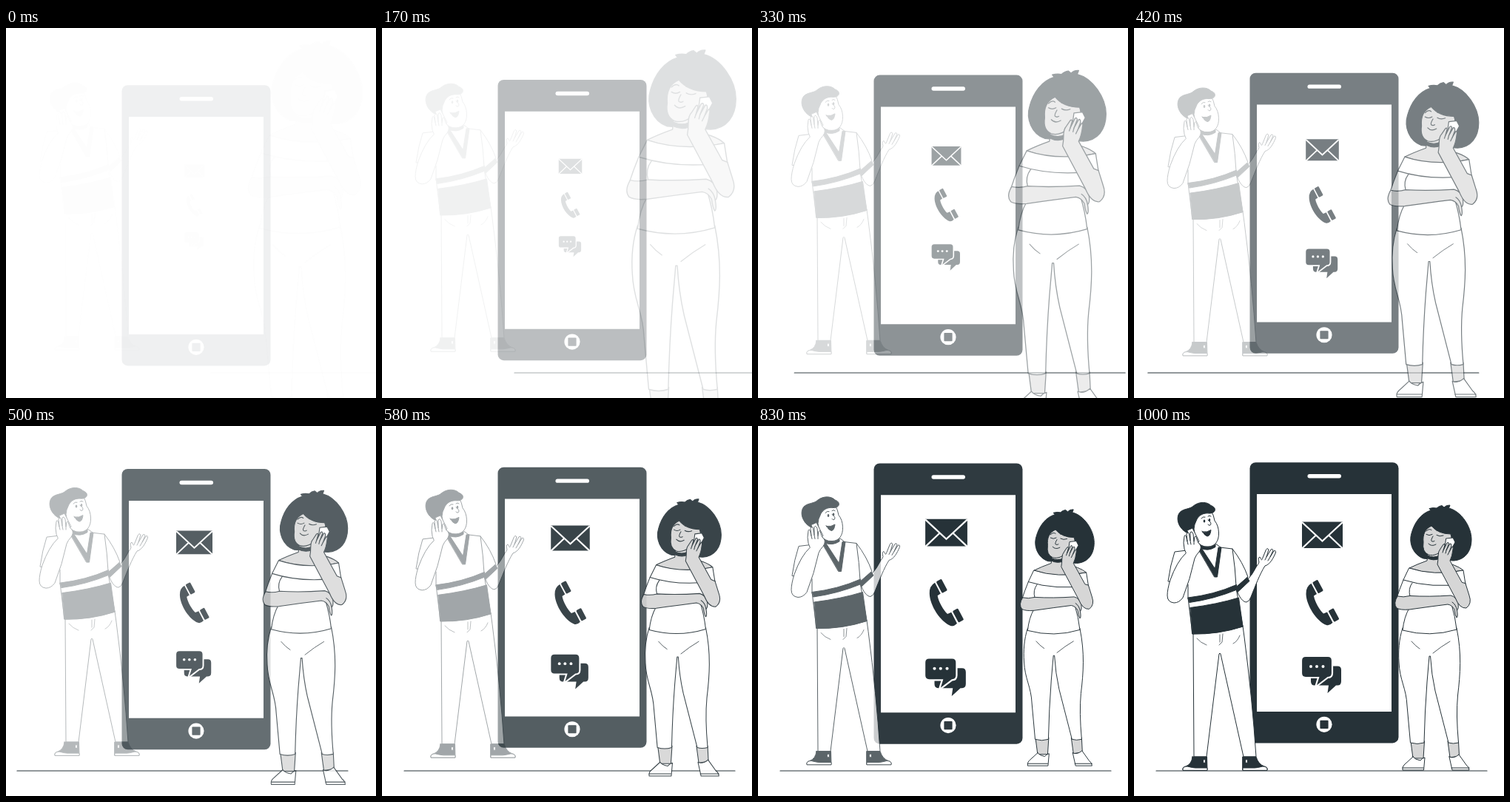
Write an HTML page that moves like this. It is 500 px wide and 500 px high and loops after 1040 ms.

```html
<!DOCTYPE html>
<html lang="en">
<head>
<meta charset="utf-8">
<title>Phone call</title>
<style>
html, body { margin: 0; width: 100%; height: 100%; overflow: hidden; background: #fff; }
svg { display: block; width: 100vw; height: 100vh; }
.line { fill: none; stroke: #263238; stroke-linecap: round; stroke-linejoin: round; }
.white { fill: #fff; }
.skin { fill: #d6d6d6; }
.dark { fill: #263238; }
.gap { fill: none; stroke: #fff; stroke-width: 2.2; }
</style>
</head>
<body>
<svg viewBox="0 0 500 500">
  <path id="floor" class="line" stroke-width="1.2" d="M30 466H477"/>

  <g id="phone" class="dark">
    <rect x="156.5" y="49.2" width="201" height="379.2" rx="8"/>
    <path class="white" d="M166 92.1H348V386H166Z"/>
    <rect class="white" x="234.5" y="65" width="45.5" height="5.4" rx="2.7"/>
    <circle class="white" cx="257" cy="403.3" r="10.6"/>
    <rect x="251.4" y="397.7" width="11.2" height="11.2" rx="1"/>
  </g>

  <g id="icons" class="dark">
    <path d="M227 129.5H282V165H227Z"/>
    <path class="gap" d="M227 130L254.5 155.500L282 130M227 165.500L245.500 148M282 165.500L263.500 148"/>
    <path d="M239.500 212.700Q232 217 232.500 227C233 243 247 264 260 269Q264 270.500 268.500 265.800L261 251.400L256 253.500C251 249 244 237 243 229.500L247 227Z"/>
    <rect x="244.500" y="208.500" width="8" height="17" rx="1.500" transform="rotate(-28 248.500 217)"/>
    <rect x="266" y="247" width="8" height="17" rx="1.500" transform="rotate(-28 270 255.500)"/>
    <path d="M244 324.500H275Q280 324.500 280 329.500V345Q280 350.500 275 350.500H273L261.500 361L263 350.500H244Q239 350.500 239 345V329Z"/>
    <path stroke="#fff" stroke-width="2.200" d="M232 311H262Q268 311 268 317V334Q268 340 262 340L245 353L249 340H232Q226 340 226 334V317Q226 311 232 311Z"/>
    <g class="white"><circle cx="239" cy="325" r="2"/><circle cx="247" cy="325" r="2"/><circle cx="255.500" cy="325" r="2"/></g>
  </g>

  <g id="man" class="line">
    <!-- trousers and shoes -->
    <path class="white" d="M80 278L81 447H98L115 308Q116 306 117 308L148 447H165Q160 370 149 285L147 270Z"/>
    <path stroke-width=".7" d="M85 287Q90 293 98 296M143 283Q140 291 134 294M120 281L119 292L115 296M116 282V292"/>
    <path class="dark" d="M79 447H98.500L99 465H66Q65 461 70 460Q78 457 79 447ZM147 447H165Q168 457 176 460Q181 461 180 465H147Z"/>
    <path class="white" d="M66 465Q65 460 72 460Q80 462 83 462H99V465ZM180 465Q181 460 174 460Q166 462 163 462H147V465Z"/>
    <ellipse class="white" cx="95" cy="453" rx="1.600" ry="2.600"/><ellipse class="white" cx="152" cy="453" rx="1.600" ry="2.600"/>
    <!-- forearm and open hand -->
    <path class="white" d="M139 222C142 231 147 238 152 238Q156 237 158 231C164 216 170 200 177 189C184 187 188 179 191.500 171Q191.500 167 189 169L184 177L188 168Q187 165 185 167L179 177L182 167Q180 164 178.500 167L174 178C172 184 172 179 170 177Q167 178 169 184Q168 187 166 189Q160 201 154 207Z"/>
    <path d="M179 177L177 181M184 177L181 182"/>
    <!-- sweater -->
    <path class="white" d="M88 166L55 170Q49 188 46 210L73 214L73 232L79 281Q114 281 147 271L138 219L154 204Q147 184 133 166L116 164Z"/>
    <path class="dark" d="M73 232Q108 228 138.500 214.500L139.500 221Q108 234 75 238.500ZM76 245.500Q112 241 141.500 232L147 271Q114 282 79 281ZM137 218.500L153 204.500L156 209.500L140 224.500Z"/>
    <path d="M133 166Q137 193 138 216"/>
    <!-- neck -->
    <path class="white" d="M91 157L89 167L109 196L117 164L109 158Z"/>
    <path class="dark" d="M90 160Q100 167 110 160V163.500Q100 170 89.500 165ZM87.500 167L91.500 165.500L109.500 193L114 164L118 164L112.500 204H109Z"/>
    <!-- head -->
    <path class="white" d="M80 122L104 114Q108 121 109 128Q114 134 114.500 144C115 156 109 163 100 163Q90 164 84 154L76 144Z"/>
    <path class="dark" d="M76 146C61 142 55 125 62 116.500C68 111 75 113 81 107.500C88 102 99 102 104 107.500C112 110 111 118 102 118C93 117 88 121 85 126L82 133Q80 139 82 145Z"/>
    <path class="dark" d="M93 143Q99 144 104 140.500Q103 149 99 149Q95 148 93 143Z"/>
    <path d="M91 125Q93 122 96 123M100 122Q102 120 104 122M100 127Q106 131 103 134Q101 135 100 133M92 142L93 144"/>
    <g class="dark" stroke="none"><ellipse cx="95" cy="128.500" rx="1.300" ry="2"/><ellipse cx="102" cy="127" rx="1.300" ry="2"/></g>
    <!-- raised arm -->
    <path class="white" d="M72 141L79 138L88 156L81 162Z"/>
    <path class="white" d="M68 166Q66 158 68 149Q69 146 70.500 149L72 156L71 146Q73 142 74.500 146L76 155L76 144Q78 141 80 146L81 156L82 150Q84 147 85 153Q86 158 89 160Q92 164 88 170Q84 174 82 179Q76 207 66 232Q61 239 54 239Q45 238 45 229Q45 221 49 208Q58 183 70 172Z"/>
    <path d="M72 156L73 160M76 155L77 160M81 156L81 160"/>
  </g>

  <g id="woman" class="line">
    <path class="dark" d="M391 179C377 174 371 158 375 145C379 130 388 118 401 114L399 111.500Q404 110 409 111Q412 108 416 107.500L419 110Q422 106.500 427 107L425.500 111C442 115 456 136 456 153C456 170 447 181 432 182Z"/>
    <!-- chest and shoulders -->
    <path class="skin" d="M397 172L396 182Q382 187 372 192Q405 204 445 195Q436 187 413 183V172Z"/>
    <path class="dark" d="M396.500 175Q405 179 413 175V179Q405 183 396 178.500Z"/>
    <!-- trousers and shoes -->
    <path class="skin" d="M374 426L377 449H391L392.500 426ZM424 426L427 448L439.500 446L438.500 426Z"/>
    <path class="white" d="M377 447L365 458Q362 461 363 465H391.500L393 448Q389 449 387 452Q380 451 377 447ZM426 447L430 465H453Q453 461 449 458L439 444Q432 450 426 447Z"/>
    <path d="M363 462H391M429 462H453"/>
    <path class="white" d="M363 273C358 288 357 305 358 319C359 344 368 354 369 378L373.500 428Q383 431 392 428Q393 385 396 346L399 311H400.500Q402 336 407 358L425 428Q431 430 438.500 428Q435 390 437.500 364C441 335 443 307 436 273Z"/>
    <path stroke-width=".8" d="M375 291Q380 297 386 301M427 291Q415 298 404 307"/>
    <!-- top -->
    <path class="white" d="M372 192Q405 203 445 195L448 214L429 241Q434 257 436 275Q400 286 363 276Q365 258 372 246L361 232Q356 232 354.500 234Q359 220 364 208Z"/>
    <path d="M364 208Q402 220 448 213M376 212Q370 220 373 230"/>
    <!-- crossed arm -->
    <path class="skin" d="M356 230Q350 240 355 246Q360 249 372 248Q400 244 424 241Q430 242 433 248Q434 256 436 259Q438 258 436.500 249Q439 247 438 240Q436 231 428 229Q398 231 373 229.500Q364 232 356 230Z"/>
    <path d="M430 238Q435 241 436.500 249"/>
    <!-- face -->
    <path class="skin" d="M402 135C393 139 390 147 391 157Q389 170 398 174C405 176 413 173 418 165L429 160Q430 151 428 146Q411 146 402 135Z"/>
    <path d="M395 146.500Q399 149 403 146.500M409 147.500Q413 150 418 148M395 142Q399 138 402 140.500M409 141.500Q413 140 417 143.500M404 149Q401 154 402 155.500Q404 157 406 155.500M398 159Q402 163.500 408 160"/>
    <!-- phone arm -->
    <path class="white" d="M422 152L431 151L434 157L427 170L420 167Z"/>
    <path class="skin" d="M448 213L453 229Q457 240 449 246Q440 247 434 232L410 187Q411 182 411 176Q411 169 414 166L418 160Q420 158 420 161L418 168L423 158Q425 156 425.500 159L422 168L427 159Q429 158 429 162L426 170L430 163Q432 163 431 167Q430 176 427 182L443 211Z"/>
    <path d="M418 168L417 171M422 168L421 172M426 170L424 174"/>
  </g>
</svg>
<script>
const STEPS = 25, LOOP = 1040;
const parts = Object.fromEntries([...document.querySelectorAll("svg [id]")].map(e => [e.id, e]));

const bezier = (x1, y1, x2, y2) => x => {
  if (x >= 1) return 1;
  const at = (a, b, s) => 3 * (1 - s) ** 2 * s * a + 3 * (1 - s) * s * s * b + s ** 3;
  let lo = 0, hi = 1;
  for (let i = 0; i < 24; i++) {
    const mid = (lo + hi) / 2;
    if (at(x1, x2, mid) < x) lo = mid; else hi = mid;
  }
  return at(y1, y2, lo);
};
const easeOut = bezier(0, 0, .58, 1);
const easeIn = bezier(.42, 0, 1, 1);
const spring = bezier(.36, -.01, .5, 1.38);

function pose(id, progress, transform) {
  parts[id].setAttribute("opacity", Math.max(0, Math.min(1, progress)));
  parts[id].setAttribute("transform", transform);
}
const shift = (x, y) => `translate(${x} ${y})`;
const zoom = (x, y, k) => `translate(${x} ${y}) scale(${k}) translate(${-x} ${-y})`;

function draw(now) {
  // 24 steps per second
  const step = Math.min(STEPS - 1, Math.floor((now % LOOP + 5) * 24 / 1000));
  const u = (step + 1) / STEPS;
  const rise = easeOut(u), drop = easeIn(u), pop = spring(u), slide = spring(u / .59);
  pose("phone", rise, shift(0, 30 * (1 - rise)));
  pose("man", drop, shift(0, -30 * (1 - drop)));
  pose("icons", pop, zoom(254.5, 240, .5 + .5 * pop));
  pose("woman", pop, zoom(404, 287, 1.5 - .5 * pop));
  pose("floor", slide, shift(250 * (1 - slide), 0));
}

const start = performance.now();
(function tick() {
  draw(performance.now() - start);
  requestAnimationFrame(tick);
})();
</script>
</body>
</html>
```
